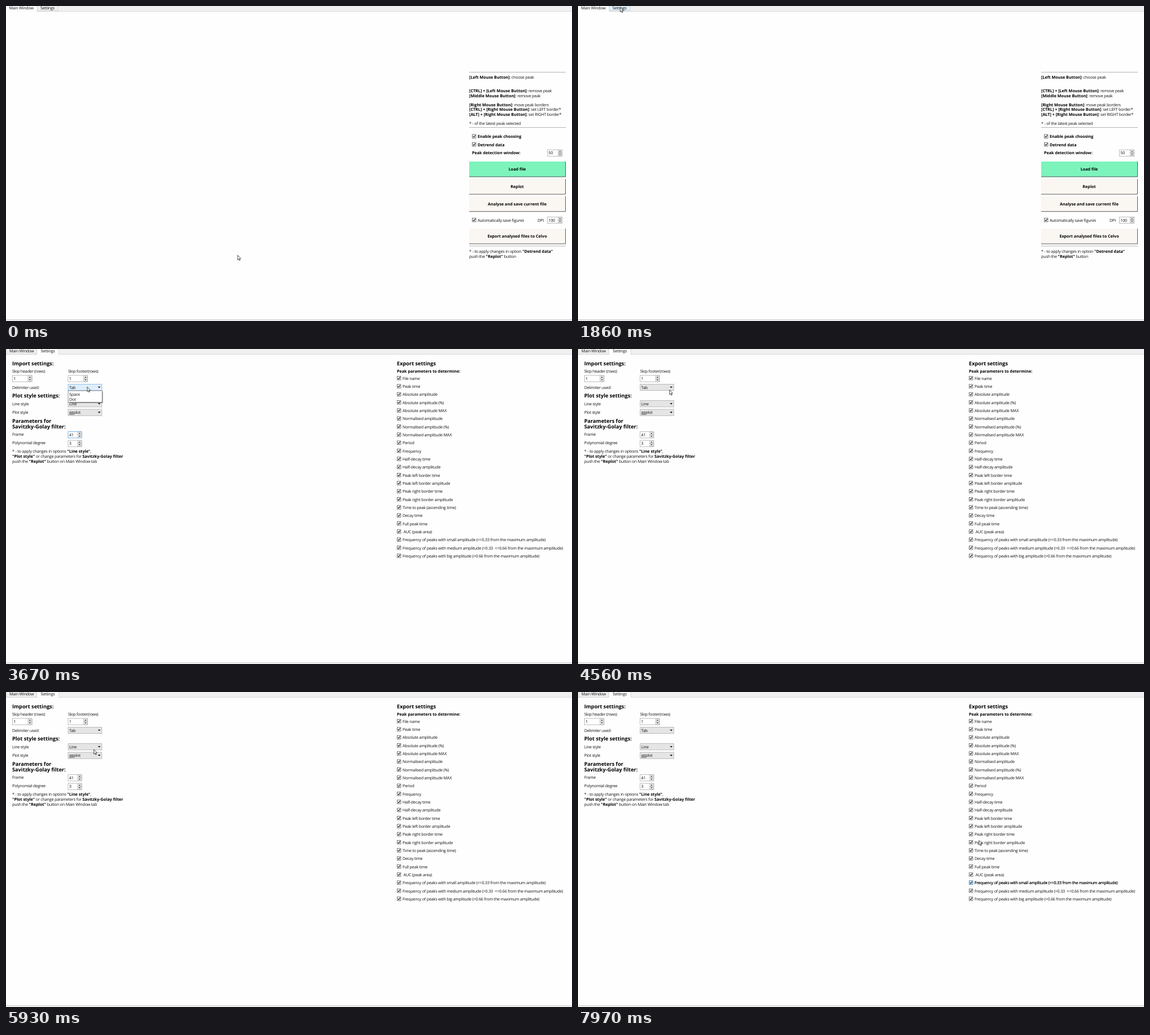
Animation, 1002 px wide and 559 px high, one loop 8000 ms. Source, as an HTML page:

```html
<!DOCTYPE html>
<html lang="en">
<head>
<meta charset="utf-8">
<title>Peak analysis settings</title>
<style>
  html, body { margin: 0; width: 100%; height: 100%; overflow: hidden; background: #fefefe; }
  svg { display: block; }
  text {
    font: 7.2px "Open Sans", "Noto Sans", sans-serif;
    letter-spacing: -.2px; fill: #111; white-space: pre;
    text-rendering: geometricPrecision;
  }
  .b { font-weight: 700; letter-spacing: 0; fill: #000; }
  .h { font-weight: 700; font-size: 9.2px; letter-spacing: 0; fill: #000; }
  .mid { text-anchor: middle; }
  .inv { fill: #fff; }
</style>
</head>
<body>
<svg width="1002" height="559" viewBox="0 0 1002 559">
  <g id="main"></g>
  <g id="settings"></g>
  <g id="live"></g>
</svg>
<script>
const LOOP = 8000, SWITCH = 2100, ROW = 8.85;
const $ = id => document.getElementById(id);

// y is the middle of the line; **...** marks bold runs
const text = (x, y, s, cls = '', drop = 2.6) =>
  `<text x="${x}" y="${y + drop}" class="${cls}">${s.replace(/\*\*(.+?)\*\*/g, '<tspan class="b">$1</tspan>')}</text>`;
const heading = (x, y, s) => text(x, y, s, 'h', 3.3);
const rect = (x, y, w, h, fill, stroke = 'none') =>
  `<rect x="${x}" y="${y}" width="${w}" height="${h}" fill="${fill}" stroke="${stroke}" stroke-width=".8"/>`;
const path = (d, fill, stroke = 'none', w = 1) =>
  `<path d="${d}" fill="${fill}" stroke="${stroke}" stroke-width="${w}"/>`;
const rule = y => rect(820, y, 171, 1, '#b4b4b4');

function check(x, y, label, cls = '', hot = false) {
  return rect(x + .5, y - 3.5, 6.4, 6.4, hot ? '#e0effc' : '#fff', hot ? '#3c8ad8' : '#555') +
    path(`M${x + 1.8} ${y - .4}l1.5 1.7l2.5 -3.4`, 'none', '#111', 1.1) +
    text(x + 10, y, label, cls);
}

function spin(x, y, w, value, focus = false) {
  const r = x + w - 7.5;
  return rect(x + .4, y - 5.6, w - .8, 11.2, '#fff', focus ? '#569de5' : '#aaa') +
    rect(r, y - 4.8, 6.5, 4.6, '#f0f0f0', '#b5b5b5') +
    rect(r, y + .3, 6.5, 4.6, '#f0f0f0', '#b5b5b5') +
    path(`M${r + 1.5} ${y - 1.5}l1.75 -2l1.75 2zM${r + 1.5} ${y + 1.6}l1.75 2l1.75 -2z`, '#333') +
    text(x + 2.3, y, value);
}

function combo(y, value, hot = false) {
  return rect(110, y - 5.6, 59.7, 11.2, hot ? '#e0eefb' : '#e5e5e5', hot ? '#7eb4ea' : '#adadad') +
    path(`M162.6 ${y - 1.3}h4.8l-2.4 2.6z`, '#111') + text(112, y, value);
}

function button(y, label, fill) {
  return rect(820, y, 171, 27.5, fill) +
    path(`M820 ${y + 27}H990.5V${y}`, 'none', '#5c5c5c') +
    text(905, y + 13.8, label, 'b mid');
}

function tabs(active, hot) {
  const strip = rect(0, 0, 1002, 9, '#f0f0f0') + rect(0, 9, 1002, .8, '#d4d4d4');
  return strip + (active
    ? rect(1, -1, 53, 10, '#f0f0f0', '#d4d4d4') + rect(54.4, -1, 39, 10.9, '#fefefe') +
      path('M54.4 0V9.4M93.5 0V9.4', 'none', '#d4d4d4', .8) +
      text(6, 3.8, 'Main Window') + text(61.5, 3.2, 'Settings')
    : rect(55.5, -1, 36.5, 9.6, hot ? '#e2f0fb' : '#f0f0f0', '#cfcfcf') +
      rect(0, -1, 55, 10.9, '#fefefe') + path('M55.3 0V9.4', 'none', '#cfcfcf', .8) +
      text(5.5, 3.2, 'Main Window') + text(61, 3.8, 'Settings'));
}

const footer = rect(0, 556, 1002, 1, '#cfcfcf') + rect(0, 557, 1002, 2, '#f0f0f0');

$('main').innerHTML = footer + rule(117) + [
  [126.5, '**[Left Mouse Button]**: choose peak'],
  [150.8, '**[CTRL] + [Left Mouse Button]**: remove peak'],
  [159.6, '**[Middle Mouse Button]**: remove peak'],
  [175, '**[Right Mouse Button]**: move peak borders'],
  [183.8, '**[CTRL] + [Right Mouse Button]**: set LEFT border*'],
  [192.6, '**[ALT] + [Right Mouse Button]**: set RIGHT border*'],
  [208.2, '* - of the latest peak selected'],
  [435.3, '* - to apply changes in option **"Detrend data"**'],
  [444, 'push the **"Replot"** button']
].map(([y, s]) => text(820, y, s)).join('') +
  rule(215) +
  check(825, 231.5, 'Enable peak choosing', 'b') +
  check(825, 246, 'Detrend data', 'b') +
  text(825, 260.8, 'Peak detection window:', 'b') +
  spin(958, 260.8, 27, '50') +
  button(276, 'Load file', '#7df4bc') +
  button(307, 'Replot', '#faf6f2') +
  button(337.7, 'Analyse and save current file', '#faf6f2') +
  check(825, 380, 'Automatically save figures') +
  text(941, 380, 'DPI') + spin(958, 380, 27, '100') +
  button(395, 'Export analysed files to Celvo', '#faf6f2') +
  rule(425.5);

const params = ['File name', 'Peak time', 'Absolute amplitude', 'Absolute amplitude (%)',
  'Absolute amplitude MAX', 'Normalised amplitude', 'Normalised amplitude (%)',
  'Normalised amplitude MAX', 'Period', 'Frequency', 'Half-decay time', 'Half-decay amplitude',
  'Peak left border time', 'Peak left border amplitude', 'Peak right border time',
  'Peak right border amplitude', 'Time to peak (ascending time)', 'Decay time', 'Full peak time',
  ' AUC (peak area)',
  'Frequency of peaks with small amplitude (&lt;=0.33 from the maximum amplitude)',
  'Frequency of peaks with medium amplitude (&gt;0.33  &lt;=0.66 from the maximum amplitude)',
  'Frequency of peaks with big amplitude (&gt;0.66 from the maximum amplitude)'];
const paramRow = (i, hot) => check(692, 52 + 14.33 * i, params[i], '', hot);

$('settings').innerHTML = footer + tabs(true) +
  heading(11, 26, 'Import settings:') +
  text(11, 39, 'Skip header (rows)') + text(110, 39, 'Skip footer(rows)') +
  spin(11, 52.5, 35.5, '1') + spin(109.5, 52.5, 35.5, '1') +
  text(11, 68, 'Delimiter used:') +
  heading(11, 83, 'Plot style settings:') +
  text(11, 97.3, 'Line style') + text(11, 112.7, 'Plot style') +
  heading(11, 127.7, 'Parameters for') + heading(11, 138, 'Savitzky-Golay filter:') +
  text(11, 151, 'Frame') +
  text(11, 166.5, 'Polynomial degree') + spin(109.5, 167.7, 25, '3') +
  text(11, 181.8, '* - to apply changes in options **"Line style"**,') +
  text(11, 190.5, '**"Plot style"** or change parameters for **Savitzky-Golay filter**') +
  text(11, 199.2, 'push the **"Replot"** button on Main Window tab') +
  heading(692, 26, 'Export settings') +
  text(692, 39, 'Peak parameters to determine:', 'b') +
  params.map((_, i) => paramRow(i)).join('');

// hot: hover span; open: [time, visible height share] steps of the sliding list
const combos = [
  { y: 68, hot: [3430, 4410], open: [[3590, .25], [3670, .56], [3760, 1], [4330, 0]],
    items: ['Tab', 'Comma', 'Space', 'Dot'] },
  { y: 97.2, hot: [5090, 5690], open: [[5180, .5], [5270, .895], [5330, 1], [5600, 0]],
    items: ['Line', 'Line &amp; s... markers', 'Line &amp; big markers', 'Small markers', 'Big markers'] },
  { y: 112.6, hot: [6410, 7080], open: [[6410, .5], [6510, 1], [7000, 0]],
    items: ['ggplot', 'fivethirtyeight', 'dark_background', 'bmh', 'grayscale'] }
];

function popup({ y, items, open }, t) {
  const share = open.reduce((s, [at, v]) => t >= at ? v : s, 0);
  if (!share) return '';
  const top = y + 6, full = items.length * ROW + 1, h = full * share;
  const rows = items.map((s, i) => {
    const lit = !i && share === 1;
    return (lit ? rect(0, .5, 60, ROW, '#0a7fd9') : '') +
      text(2, .5 + ROW * (i + .5), s, lit ? 'inv' : '');
  }).join('');
  return rect(112, top + 1.5, 59.5, h, '#8a8a8a') +
    `<svg x="110" y="${top}" width="60" height="${h}" overflow="hidden">` +
    rect(0, 0, 60, h, '#fff') + `<g transform="translate(0 ${h - full})">${rows}</g></svg>` +
    rect(110, top, 60.2, h, 'none', '#777');
}

// pointer moves: start, end, number of steps, destination
const moves = [
  [320, 320, 1, 400.5, 437], [470, 1210, 10, 76, 1], [1290, 1370, 2, 75.5, 0],
  [1710, 1950, 4, 73.5, 4],
  [2580, 2830, 4, 50, 24], [2910, 3340, 6, 149, 60], [3430, 3590, 3, 143.5, 67],
  [4330, 4650, 5, 174, 76], [4730, 5090, 6, 146, 97],
  [5840, 6000, 3, 160, 104], [6090, 6260, 3, 145.5, 114],
  [7000, 7400, 6, 848, 160], [7480, 7480, 1, 840, 168],
  [7650, 7730, 2, 745, 300], [7810, 7810, 1, 715, 338], [7890, 7890, 1, 698, 343],
  [7970, 7970, 1, 709.5, 263]
];

function pointer(t) {
  let x = 409.8, y = 442;
  for (const [from, to, steps, tx, ty] of moves) {
    if (t < from) break;
    const done = t >= to ? 1 : (Math.floor((t - from) / (to - from) * (steps - 1)) + 1) / steps;
    x += (tx - x) * done;
    y += (ty - y) * done;
  }
  return `<g transform="translate(${x} ${y})">` +
    path('M.3 .3V8.5L2.1 6.8L3.4 9.7L4.7 9.1L3.4 6.3H5.9Z', '#fff', '#111', .75) + '</g>';
}

function liveSettings(t) {
  const focus = t < 3760, caret = focus && (t - SWITCH) % 1060 < 480;
  return spin(109.5, 152.3, 25, '41', focus) +
    (caret ? rect(112, 148.3, .8, 8, '#111') : '') +
    combos.map(c => combo(c.y, c.items[0], t >= c.hot[0] && t < c.hot[1])).join('') +
    combos.map(c => popup(c, t)).join('') +
    (t >= 7810 ? paramRow(20, true) : '');
}

function draw(now) {
  const t = now % LOOP, onSettings = t >= SWITCH;
  $('main').style.display = onSettings ? 'none' : '';
  $('settings').style.display = onSettings ? '' : 'none';
  $('live').innerHTML = (onSettings ? liveSettings(t) : tabs(false, t >= 1710)) + pointer(t);
}

const start = performance.now();
function tick() {
  draw(performance.now() - start);
  requestAnimationFrame(tick);
}
tick();
</script>
</body>
</html>
```
